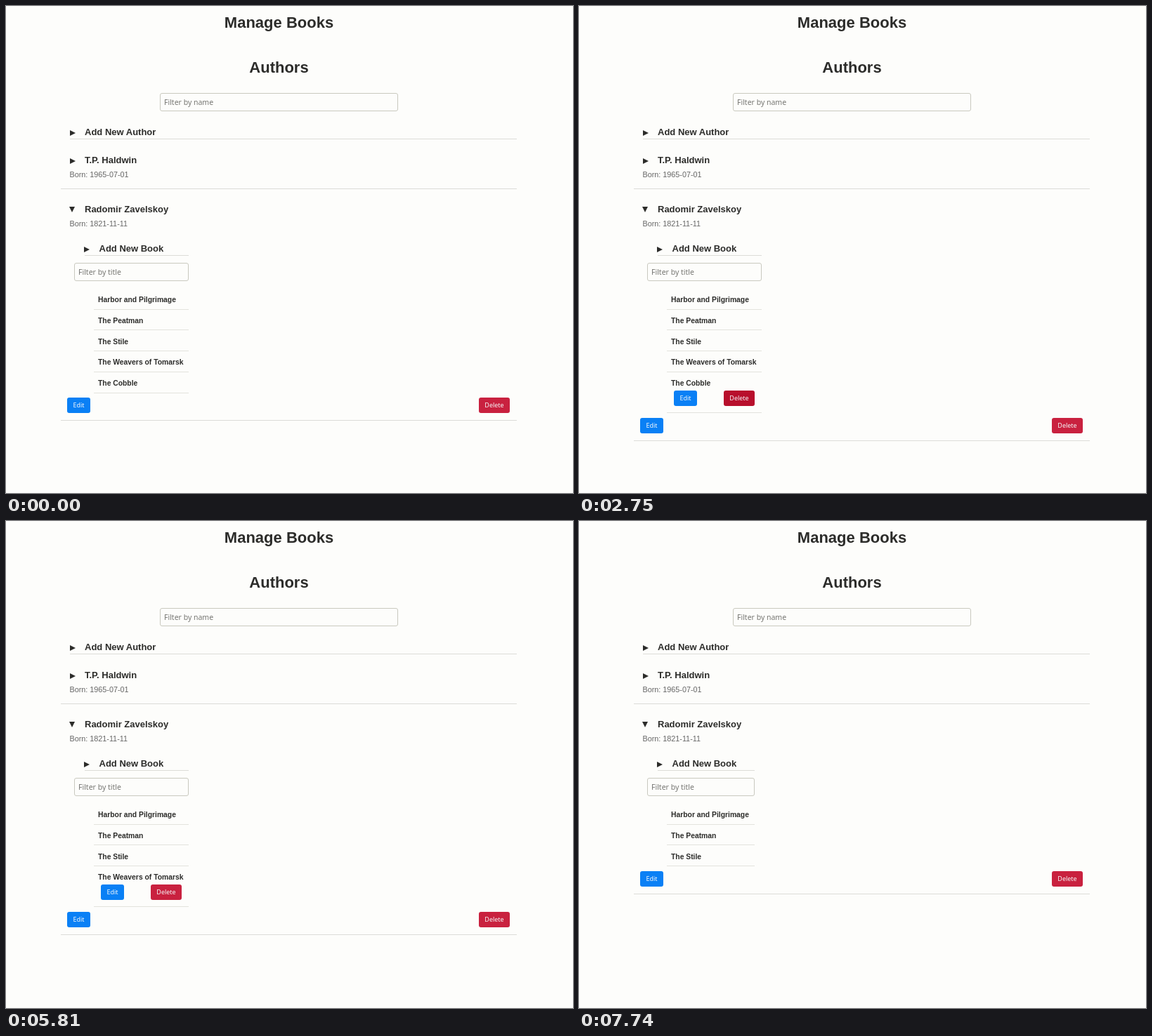
An HTML page that plays this animation: 807 px wide and 694 px high, repeating every 8 s.

```html
<!DOCTYPE html>
<html lang="en">
<head>
<meta charset="utf-8">
<title>Manage Books</title>
<style>
  html, body { margin: 0; width: 100%; height: 100%; overflow: hidden; background: #fdfdfb; }
  #stage {
    position: relative; width: 807px; height: 694px; overflow: hidden;
    font: 13px/20px "Liberation Sans", Arial, sans-serif; color: #2c2c2a;
  }
  #stage * { position: absolute; box-sizing: border-box; margin: 0; white-space: nowrap; }

  /* text is placed by its left edge and vertical middle */
  h1, h2, h3, p, .title { left: var(--x); top: calc(var(--y) - 10px); }
  h1 { font-size: 22px; left: 0; width: 777px; text-align: center; }
  h2 { font-size: 13px; }
  h3, .title { font-size: 10.35px; font-weight: bold; }
  p { font-size: 10.8px; color: #666; }

  .line { height: 1px; background: #dcdcd8; left: var(--x); top: var(--y); right: var(--r, 80px); }
  .tri { left: var(--x); top: var(--y); width: 8px; height: 8px; background: #2c2c2a; clip-path: polygon(0 0, 100% 50%, 0 100%); }
  .tri.open { clip-path: polygon(0 0, 100% 0, 50% 100%); }
  .field {
    height: 26px; border: 1px solid #c9c9bf; border-radius: 3px; padding-left: 5px;
    font: 10.5px/24px "Noto Sans", sans-serif; color: #767672;
  }
  .btn {
    height: 22px; border-radius: 3px; text-align: center; color: #f6f8fa;
    font: 9px/22px "Noto Sans", sans-serif;
  }
  .edit { width: 33px; background: #0a80f5; }
  .del { width: 44px; background: #c9213f; }

  /* book list: its right edge follows the longest title */
  #books { left: 97px; top: 0; width: 163px; height: 694px; animation: narrow 8s step-end infinite; }
  #books .line { --r: 0px; --x: 28px; background: #e3e3dd; }
  #books .title { --x: 34px; }
  .tools { left: 0; top: var(--y); visibility: hidden; }
  .tools .edit { left: 38px; }
  .tools .del { left: 109px; }
  .row { left: 0; top: 0; width: 100%; height: 100%; }

  #last { animation: fadeLast 8s linear infinite; }
  #last .tools { animation: showLast 8s step-end infinite; }
  #last .line { animation: dropLast 8s step-end infinite; }
  #last .del { animation: hoverLast 8s ease infinite; }
  #next { animation: fadeNext 8s linear infinite; }
  #next .tools { animation: showNext 8s step-end infinite; }
  #next .line { animation: dropNext 8s step-end infinite; }
  #next .del { animation: hoverNext 8s ease infinite; }
  #foot { left: 0; top: 558px; width: 807px; height: 40px; animation: shift 8s step-end infinite; }

  @keyframes narrow { 0% { width: 163px } 95.125%, 100% { width: 153px } }
  @keyframes shift {
    0% { top: 558px } 25.375% { top: 587px } 44.5% { top: 529px }
    72.625% { top: 557px } 95.125%, 100% { top: 499px }
  }
  @keyframes fadeLast { 0%, 40.25% { opacity: 1 } 44.5%, 100% { opacity: 0 } }
  @keyframes fadeNext { 0%, 90.6% { opacity: 1 } 95.125%, 100% { opacity: 0 } }
  @keyframes showLast { 0% { visibility: hidden } 25.375%, 100% { visibility: visible } }
  @keyframes showNext { 0% { visibility: hidden } 72.625%, 100% { visibility: visible } }
  @keyframes dropLast { 0% { top: 551px } 25.375%, 100% { top: 579px } }
  @keyframes dropNext { 0% { top: 521px } 72.625%, 100% { top: 549px } }
  @keyframes hoverLast { 0%, 31.375% { background: #c9213f } 35.125%, 100% { background: #b80f2c } }
  @keyframes hoverNext { 0%, 77.375% { background: #c9213f } 81%, 100% { background: #b80f2c } }
</style>
</head>
<body>
<div id="stage">
  <h1 style="--y:24px">Manage Books</h1>
  <h1 style="--y:88px">Authors</h1>
  <div class="field" style="left:219px;top:124px;width:339px">Filter by name</div>

  <div class="tri" style="--x:91px;--y:177px"></div>
  <h2 style="--x:112px;--y:180px">Add New Author</h2>
  <div class="line" style="--x:91px;--y:189px"></div>

  <div class="tri" style="--x:91px;--y:217px"></div>
  <h2 style="--x:112px;--y:220px">T.P. Haldwin</h2>
  <p style="--x:90.5px;--y:240px">Born: 1965-07-01</p>
  <div class="line" style="--x:78px;--y:260px"></div>

  <div class="tri open" style="--x:90px;--y:286px"></div>
  <h2 style="--x:112px;--y:290px">Radomir Zavelskoy</h2>
  <p style="--x:90.5px;--y:310px">Born: 1821-11-11</p>

  <div class="tri" style="--x:111px;--y:343px"></div>
  <h2 style="--x:132.5px;--y:346px">Add New Book</h2>

  <div id="books">
    <div class="line" style="--x:15px;--y:355px;background:#dcdcd8"></div>
    <div class="field" style="left:0;top:366px;width:100%">Filter by title</div>
    <div class="title" style="--y:419px">Harbor and Pilgrimage</div>
    <div class="line" style="--y:432px"></div>
    <div class="title" style="--y:449px">The Peatman</div>
    <div class="line" style="--y:461px"></div>
    <div class="title" style="--y:479px">The Stile</div>
    <div class="line" style="--y:491px"></div>
    <div class="row" id="next">
      <div class="title" style="--y:508px">The Weavers of Tomarsk</div>
      <div class="tools" style="--y:518px"><div class="btn edit">Edit</div><div class="btn del">Delete</div></div>
      <div class="line" style="--y:521px"></div>
    </div>
    <div class="row" id="last">
      <div class="title" style="--y:538px">The Cobble</div>
      <div class="tools" style="--y:548px"><div class="btn edit">Edit</div><div class="btn del">Delete</div></div>
      <div class="line" style="--y:551px"></div>
    </div>
  </div>

  <div id="foot">
    <div class="btn edit" style="left:87px">Edit</div>
    <div class="btn del" style="left:673px">Delete</div>
    <div class="line" style="--x:78px;--y:32px"></div>
  </div>
</div>
</body>
</html>
```
